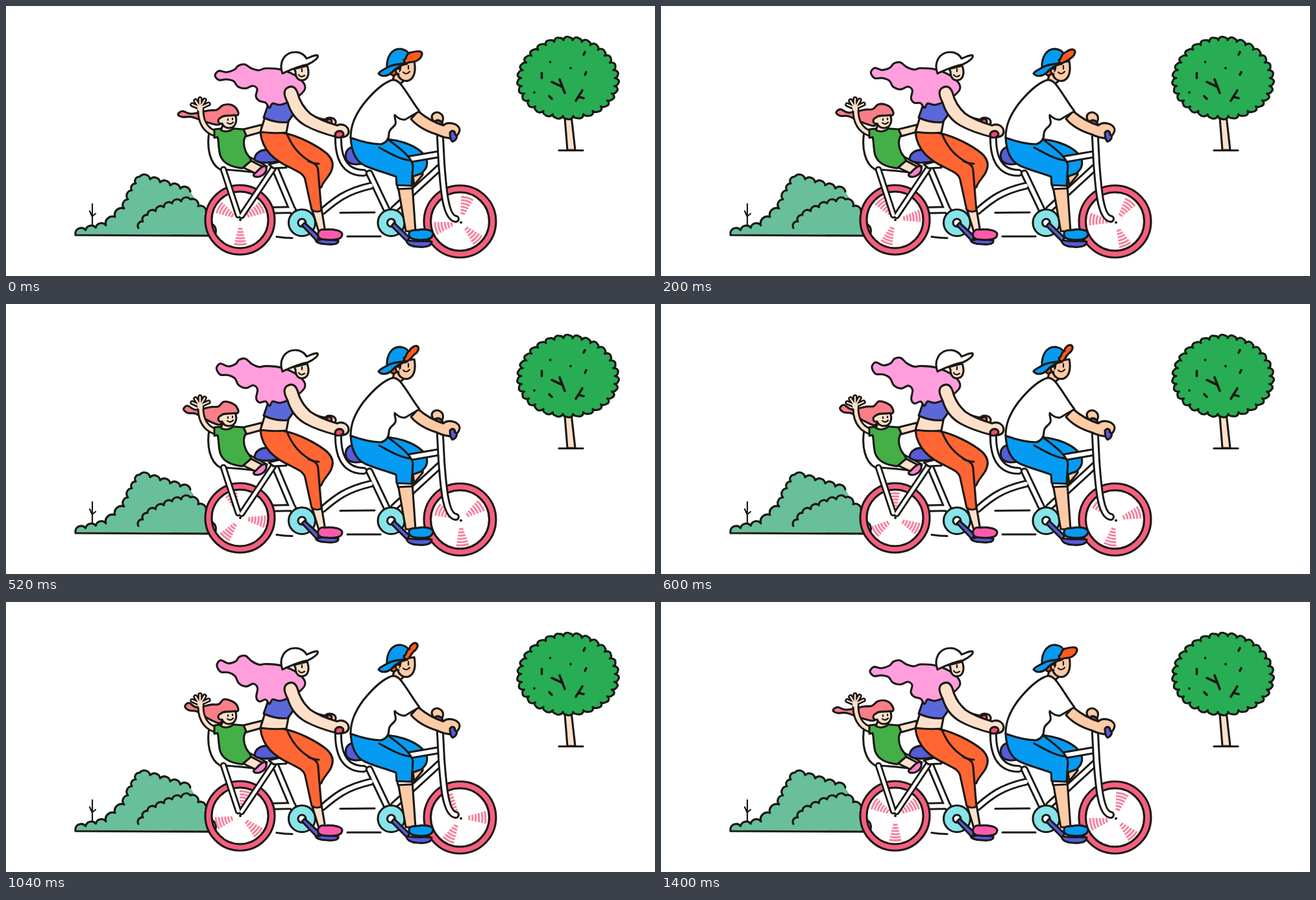
Animation of 1000 by 416 pixels, one loop 1.6 s. Source, as an HTML page:

```html
<!DOCTYPE html>
<html lang="en">
<head>
<meta charset="utf-8">
<title>Family tandem ride</title>
<style>
  html, body { margin: 0; width: 100%; height: 100%; overflow: hidden; background: #fff; }
  svg {
    display: block; width: 100vw; height: 100vh;
    fill: none; stroke: #1a1814; stroke-width: 3.1;
    stroke-linecap: round; stroke-linejoin: round;
  }
  .skin { fill: #fde0ca; }
  .tan { fill: #fdcba6; }
  .white { fill: #fff; }
  .ring { fill: #f55f80; }
  .blue { fill: #059bf3; }
  .purple { fill: #555cd8; }
  .orange { fill: #ff6633; }
  .teal { fill: #86e4ea; }
  .bush { fill: #69bf9b; }
  .dot { fill: #1a1814; stroke: none; }
  .blades { stroke: #f8819b; stroke-width: 3; stroke-linecap: butt; }
  .fine { stroke-width: 2.2; }
  .rim { stroke-width: 12; }
  .core { stroke: #fff; stroke-width: 6; }
  .thin.rim { stroke-width: 10.5; }
  .thin.core { stroke-width: 4.8; }
  .limb.rim { stroke-width: 11; }
  .limb.core { stroke: #fde0ca; stroke-width: 5.2; }
  .finger.rim { stroke-width: 7.4; }
  .finger.core { stroke: #fde0ca; stroke-width: 2.4; }
</style>
</head>
<body>
<svg viewBox="0 0 1000 416">
  <defs>
    <path id="stays" d="M335 252L358 322M412 250L363 323"/>
    <path id="rearFrame" d="M398 315L442 314M414 249L443 318"/>
    <path id="midFrame" d="M488 316C508 299 523 286 562 277M512 199C511 228 518 257 551 257M560 258L590 321M622 236L669 228M669 248L598 313"/>
    <path id="fork" d="M668 184L671 242C674 282 677 326 693 328"/>
    <path id="waveArm" d="M300 160C300 178 306 190 321 196"/>
    <path id="fingers" d="M299 157L287 152M299 157L292 146M299 157L299 143M299 157L306 145M299 157L312 151"/>
  </defs>

  <!-- scenery -->
  <path class="bush" id="backBush"/>
  <path class="bush" id="frontBush"/>
  <path class="fine" d="M133 305V339M133 325L129 316M133 324L138 320"/>
  <path class="skin" d="M860 160L865 222H877L870 160Z"/>
  <path d="M852 222.500H889"/>
  <path id="crown" fill="#28ad55"/>
  <path stroke-width="3.600" d="M892 71L890 75M894 102L892 106M825.500 103V111M837 139L841 143M841 117L856 124M853 113L861 134M888 130L878 146M882 140L890 142M838.500 86V86.500M870 95.500V96M814 133V133.500"/>
  <path d="M417 355.500Q429 357.500 441 357.500M515 318.500L568 318M526 355L577 355"/>

  <!-- bicycle -->
  <use href="#rearFrame" class="rim"/><use href="#rearFrame" class="core"/>
  <circle class="ring" cx="360.500" cy="329.500" r="53.500"/>
  <circle class="white" cx="360.500" cy="329.500" r="43.500"/>
  <path d="M319 337Q325 342 323 350"/>
  <circle class="ring" cx="699.500" cy="332" r="55.500"/>
  <circle class="white" cx="699.500" cy="332" r="45"/>
  <g transform="translate(361 329.500)"><path class="blades" id="rearBlades"/></g>
  <g transform="translate(700 333)"><path class="blades" id="frontBlades"/></g>
  <path class="white" d="M313 194C309 219 314 243 330 252C350 252 372 255 398 258L402 247L374 232L334 194Z"/>
  <use href="#stays" class="thin rim"/><use href="#stays" class="thin core"/>
  <circle class="dot" cx="361" cy="329.500" r="2"/>
  <path class="white" d="M405 244L430 238L432 249L412 250Z"/>
  <path class="purple" d="M383 237C383 226 394 220 406 222L420 239C408 242 390 243 383 237Z"/>

  <!-- far limbs of the front rider -->
  <path class="tan" d="M626 256L629 276L642 260V252Z"/>
  <path class="blue" d="M575 205C610 204 641 219 648 236C651 248 645 253 640 258L626 263L610 232Z"/>
  <use href="#midFrame" class="rim"/><use href="#midFrame" class="core"/>
  <path class="purple" d="M524 236C521 222 530 215 541 218L554 241C542 246 528 245 524 236Z"/>
  <circle class="teal" cx="456" cy="334" r="20.500"/><circle class="white" cx="456" cy="334" r="6"/>
  <circle class="teal" cx="593.500" cy="334" r="20.500"/><circle class="white" cx="593.500" cy="334" r="6"/>
  <path class="tan" d="M657 175C652 164 668 159 673 170C675 177 670 183 665 183Z"/>
  <use href="#fork" class="rim"/><use href="#fork" class="core"/>
  <circle class="dot" cx="701" cy="333.500" r="2"/>
  <path class="purple" d="M661 178C664 174 671 176 673 182L668 184Z"/>

  <!-- child -->
  <path class="skin" d="M366 190L394 183V194L369 201Z"/>
  <path class="skin" d="M366 249L376 237C384 243 392 245 397 249L386 259C380 255 373 253 366 249Z"/>
  <path fill="#f681cc" d="M382 259C388 255 391 248 399 246C404 251 400 260 390 263C384 264 380 262 382 259Z"/>
  <path id="childHair" fill="#fb7d88"/>
  <use href="#waveArm" class="limb rim"/>
  <use href="#fingers" class="finger rim"/><use href="#fingers" class="finger core"/>
  <circle class="skin" cx="299" cy="158" r="4" stroke="none"/>
  <use href="#waveArm" class="limb core"/>
  <path fill="#43af46" d="M321 190C335 188 355 189 366 190L370 199C365 206 366 216 369 223C371 230 379 235 377 239L364 250C344 248 334 241 330 230C327 219 328 208 326 202L321 203Z"/>
  <path class="skin" d="M334 183C333 187 332 189 331 191C337 195 346 193 350 189L350 183Z"/>
  <path class="skin" d="M333 181C326 183 325 174 331 172C335 167 345 170 353 168C357 176 354 188 344 188C339 188 335 186 333 181Z"/>
  <path class="fine" d="M342 174V176M349 173V175M341 180Q346 184 350 179"/>

  <!-- rear rider -->
  <path class="skin" d="M468 167C478 172 486 175 492 175C496 170 507 172 508 178C509 184 501 187 494 184L465 180Z"/>
  <circle cx="498" cy="178" r="4" fill="#ed4c78"/>
  <path class="purple" d="M480 361L489 359C496 361 506 360 512 361C513 367 505 368 494 367C484 367 477 364 477 360L456 338L460 334L483 355Z"/>
  <path class="skin" d="M471 312L482 348H492L486 312Z"/>
  <path fill="#fb5bad" d="M481 349C486 341 490 346 496 344C506 344 518 346 518 352C518 360 505 361 494 360C484 360 479 357 481 349Z"/>
  <path class="orange" d="M430 196C452 201 478 214 494 227C504 236 506 246 500 257C495 266 489 270 486 279L470 290L450 235Z"/>
  <path class="orange" d="M392 195C404 193 424 194 433 197C438 210 447 226 466 238C474 243 480 243 481 254L486 315C481 318 475 317 471 314L461 268C459 258 449 255 438 249C414 238 395 223 392 195Z"/>
  <path d="M466 239Q475 243 482 243"/>
  <path class="skin" d="M400 168L392 194C406 196 422 196 432 195L436 174Z"/>
  <path fill="#5a68da" d="M406 146L397 172C410 178 424 180 434 179L448 160L436 138Z"/>
  <path id="riderHair" fill="#ff9edc"/>
  <path class="skin" d="M432 127C440 121 446 125 449 133C453 149 460 158 469 166C483 176 500 181 510 184C520 180 528 186 528 194C527 202 519 203 510 202C494 198 477 193 461 184C447 176 438 163 434 149C429 139 427 132 432 127Z"/>
  <path fill="#ed4c78" d="M507 198C509 191 518 191 520 197C520 202 513 204 508 202Z"/>
  <path class="skin" d="M446 101C446 112 452 116 459 114C466 112 468 102 464 92L444 97Z"/>
  <path class="fine" d="M456 97V101M451 106Q454 111 460 107"/>
  <path class="white" d="M426 104C420 88 428 71 446 71C454 71 461 76 463 81C469 79 475 75 480 76C483 79 474 86 465 90C449 93 437 99 426 104Z"/>

  <!-- front rider -->
  <path class="purple" d="M619 361C632 364 646 361 656 363C656 371 644 372 634 371C625 371 618 367 617 362L594 339L598 334L622 357Z"/>
  <path class="tan" d="M604 278L616 347H631L626 276Z"/>
  <path class="blue" d="M621 350C623 343 632 347 640 344C650 344 659 346 658 352C656 360 645 361 635 360C626 360 620 357 621 350Z"/>
  <path class="white" d="M602 273L604 282L626 281V273Z"/>
  <path class="blue" d="M531 202C532 224 538 239 553 246C568 253 586 257 601 263L602 276L625 277L627 246C626 234 608 220 588 205Z"/>
  <path d="M575 218C590 226 606 236 623 238"/>
  <path class="tan" d="M635 162C648 173 661 180 674 184C681 177 697 181 699 190C699 197 694 200 690 204C680 204 672 202 664 198C648 193 634 186 624 174Z"/>
  <path class="purple" d="M684 195C688 190 692 193 692 198C697 200 694 207 688 209C684 206 684 200 684 195Z"/>
  <path class="tan" d="M599 103L596 114L606 121L617 112Z"/>
  <path class="white" d="M590 116C596 112 602 114 607 119C618 132 626 148 637 162L615 175C608 176 603 172 599 168C598 174 602 177 600 182C597 188 590 189 590 197C590 206 585 211 578 213C562 213 545 208 531 203C531 185 537 170 550 152C562 137 577 122 590 116Z"/>
  <path class="tan" d="M603 101C604 112 612 117 620 115C629 112 632 100 629 85L606 89Z"/>
  <path fill="#f4521c" d="M596 100C590 104 595 109 600 106L607 99L608 93Z"/>
  <path class="tan" d="M606 97C600 94 598 103 605 105"/>
  <path class="fine" d="M620 92V97M612 102Q617 107 622 101"/>
  <path class="blue" d="M587 95C586 79 594 66 607 66C615 67 621 71 622 78L618 89C606 91 599 97 594 103C588 108 579 110 574 104C576 100 582 98 587 95Z"/>
  <path d="M587 95C596 89 607 90 614 88"/>
  <path id="quiff" fill="#ff5a1f"/>
</svg>

<script>
const $ = id => document.getElementById(id);
const shape = (id, d) => $(id).setAttribute('d', d);
const clamp = v => Math.min(1, Math.max(0, v));

// Leafy bumps along a line of key points
function bumps(points, size) {
  let d = '';
  points.slice(1).forEach(([x, y], i) => {
    const [x0, y0] = points[i];
    const length = Math.hypot(x - x0, y - y0);
    const n = Math.max(1, Math.round(length / size));
    const r = length / n * .55;
    for (let k = 1; k <= n; k++) d += `A${r} ${r} 0 0 1 ${x0 + (x - x0) * k / n} ${y0 + (y - y0) * k / n}`;
  });
  return d;
}

// Egg-shaped crown with a ring of leaf tips
function crown(leaves) {
  const at = (turn, k) => {
    const a = turn / leaves * 2 * Math.PI;
    return [866 + 75 * k * Math.cos(a) * (1 + .06 * Math.sin(a)), 111 + 61 * k * Math.sin(a)];
  };
  let d = `M${at(0, .96)}`;
  for (let i = 0; i < leaves; i++) d += `C${at(i + .1, 1.05)} ${at(i + .4, 1.06)} ${at(i + .65, 1.03)}Q${at(i + .95, 1.02)} ${at(i + 1, .96)}`;
  return d + 'Z';
}

// Three fans of concentric arcs
function blades(first, outer) {
  let d = '';
  for (let b = 0; b < 3; b++) {
    const mid = (first + b * 120) * Math.PI / 180;
    for (let i = 0; i < 6; i++) {
      const r = 14 + (outer - 14) * i / 5;
      const p = a => `${r * Math.cos(a)} ${r * Math.sin(a)}`;
      d += `M${p(mid - .25)}A${r} ${r} 0 0 1 ${p(mid + .25)}`;
    }
  }
  return d;
}

// Smooth closed outline through key points
function spline(points) {
  const at = i => points.at(i % points.length);
  return points.reduce((d, b, i) => {
    const a = at(i - 1), c = at(i + 1), e = at(i + 2);
    return d + `C${b.map((v, j) => v + (c[j] - a[j]) / 6)} ${c.map((v, j) => v - (e[j] - b[j]) / 6)} ${c}`;
  }, `M${points[0]}`) + 'Z';
}

// Wind lifts the loose end and fattens the curls around the middle height
function blow({ points, root, length, middle, dx, dy }, lift) {
  return spline(points.map(([x, y]) => {
    const loose = clamp((root - x) / length);
    const swell = .28 * (y - middle) * Math.min(1, 5 * loose);
    return [x + lift * dx * loose, y + lift * (swell + dy * loose ** 2)];
  }));
}

const riderHair = {
  root: 402, length: 80, middle: 110, dx: 3, dy: -9,
  points: [[424, 98], [400, 96], [390, 99], [378, 96], [368, 90], [358, 92], [352, 98], [340, 102], [328, 100],
    [322, 107], [328, 114], [340, 113], [351, 116], [357, 124], [369, 127], [380, 123], [387, 128], [385, 139],
    [390, 146], [400, 149], [406, 157], [411, 150], [424, 152], [448, 141], [461, 126], [450, 110]]
};
const childHair = {
  root: 345, length: 80, middle: 168, dx: 11, dy: -6,
  points: [[355, 158], [346, 152], [334, 153], [325, 160], [312, 161], [286, 166], [272, 162], [265, 167],
    [272, 171], [286, 171], [306, 178], [325, 183], [332, 180], [340, 170], [357, 168]]
};

shape('backBush', 'M326 354L107 353V349' +
  bumps([[107, 349], [154, 338], [182, 312], [194, 284], [206, 263], [222, 267], [284, 286]], 16));
shape('frontBush', 'M204 342' + bumps([[204, 342], [218, 322], [256, 304], [284, 298], [308, 319]], 15));
shape('crown', crown(30));
shape('rearBlades', blades(90, 38));
shape('frontBlades', blades(-74, 39));

const loop = 1600, tick = 200, last = 1400;
let shown;
function draw() {
  const step = Math.floor(performance.now() % loop / tick) * tick;
  const start = step === 1000 ? 800 : step; // one pose is held twice as long
  if (start !== shown) {
    shown = start;
    const u = start / last;
    const lift = Math.sin(Math.PI * u);
    shape('riderHair', blow(riderHair, lift));
    shape('childHair', blow(childHair, lift));
    const x = 641 - 7 * lift, y = 72 - 7 * lift;
    shape('quiff', `M613 83C618 82 615 75 622 72C${x - 14} 71 ${x - 8} ${y - 3} ${x - 3} ${y - 2}C${x + 3} ${y} ${x - 1} ${y + 8} ${x - 6} ${y + 11}C${x - 10} ${y + 15} 622 86 620 87C617 90 613 87 613 83Z`);
    const turn = `rotate(${120 * u ** .9})`;
    $('rearBlades').setAttribute('transform', turn);
    $('frontBlades').setAttribute('transform', turn);
  }
  requestAnimationFrame(draw);
}
draw();
</script>
</body>
</html>
```
